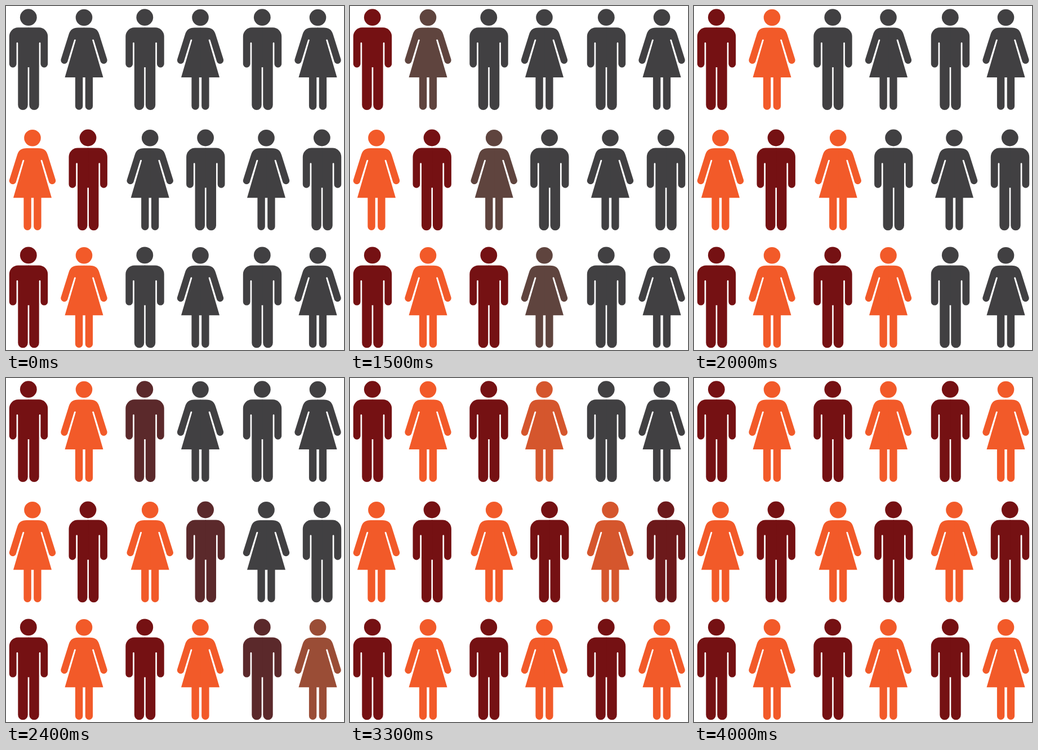
These frames come from a looping animation (600x612 px, 8 s). An HTML page:

```html
<!DOCTYPE html>
<html lang="en">
<head>
<meta charset="utf-8">
<title>People pictograms</title>
<style>
  html, body { margin: 0; height: 100%; overflow: hidden; background: #fff; }
  svg { display: block; width: 600px; height: 612px; }
</style>
</head>
<body>
<svg viewBox="0 0 600 612">
  <defs>
    <!-- Right halves, overlapping the centre line slightly so that no seam shows -->
    <path id="manHalf" d="M-.5 38.3H18.5A15.7 15.7 0 0 1 34.2 54V103A6.4 6.4 0 0 1 21.4 103V66.2A1.35 1.35 0 0 0 18.7 66.2V176.3A8.7 8.7 0 0 1 1.3 176.3V109H-.5Z"/>
    <path id="womanHalf" d="M-.5 38.6H10C20 38.6 24.7 42.5 27.2 51L41 95A6.2 6.2 0 0 1 29.3 99L17.5 60.5A1.5 1.5 0 0 0 14.6 60.5L34 127H15.6V178A6.7 6.7 0 0 1 2.2 178V127H-.5Z"/>
    <g id="man">
      <circle cx="-.2" cy="20.2" r="14.9"/>
      <use href="#manHalf"/><use href="#manHalf" transform="scale(-1 1)"/>
    </g>
    <g id="woman">
      <circle cy="20.5" r="14.8"/>
      <use href="#womanHalf"/><use href="#womanHalf" transform="scale(-1 1)"/>
    </g>
  </defs>
  <g id="crowd"></g>
</svg>
<script>
const LOOP = 8000, STEP = 100, STEPS = 6;
const GREY = [65, 64, 66];
const COLOURS = { man: [117, 17, 19], woman: [242, 90, 41] };
const FILLED = -LOOP;

const outerX = [40, 138.5, 246.5, 345, 455, 553.5];
const rows = [
  { y: 0, first: 'man', xs: outerX, starts: [500, 1500, 2200, 2900, 3500, 3500] },
  { y: 214.3, first: 'woman', xs: [47, 145.7, 255.7, 354.3, 462, 561],
    starts: [FILLED, FILLED, 1500, 2200, 2900, 2900] },
  { y: 423.2, first: 'man', xs: outerX, starts: [FILLED, FILLED, 500, 1500, 2200, 2200] }
];

const crowd = document.getElementById('crowd');
const people = rows.flatMap(({ y, first, xs, starts }) => xs.map((x, i) => {
  const kind = (i % 2 === 0) === (first === 'man') ? 'man' : 'woman';
  const node = document.createElementNS('http://www.w3.org/2000/svg', 'use');
  node.setAttribute('href', '#' + kind);
  node.setAttribute('transform', `translate(${x} ${y})`);
  crowd.append(node);
  return { node, start: starts[i], colour: COLOURS[kind] };
}));

function draw(now) {
  const t = now % LOOP;
  for (const { node, start, colour } of people) {
    const step = Math.floor((t - start) / STEP) + 1;
    const mix = Math.max(0, Math.min(1, step / STEPS));
    const rgb = GREY.map((g, i) => Math.round(g + (colour[i] - g) * mix));
    node.setAttribute('fill', `rgb(${rgb})`);
  }
}

const origin = performance.now();
function tick() {
  draw(performance.now() - origin);
  requestAnimationFrame(tick);
}
tick();
</script>
</body>
</html>
```
